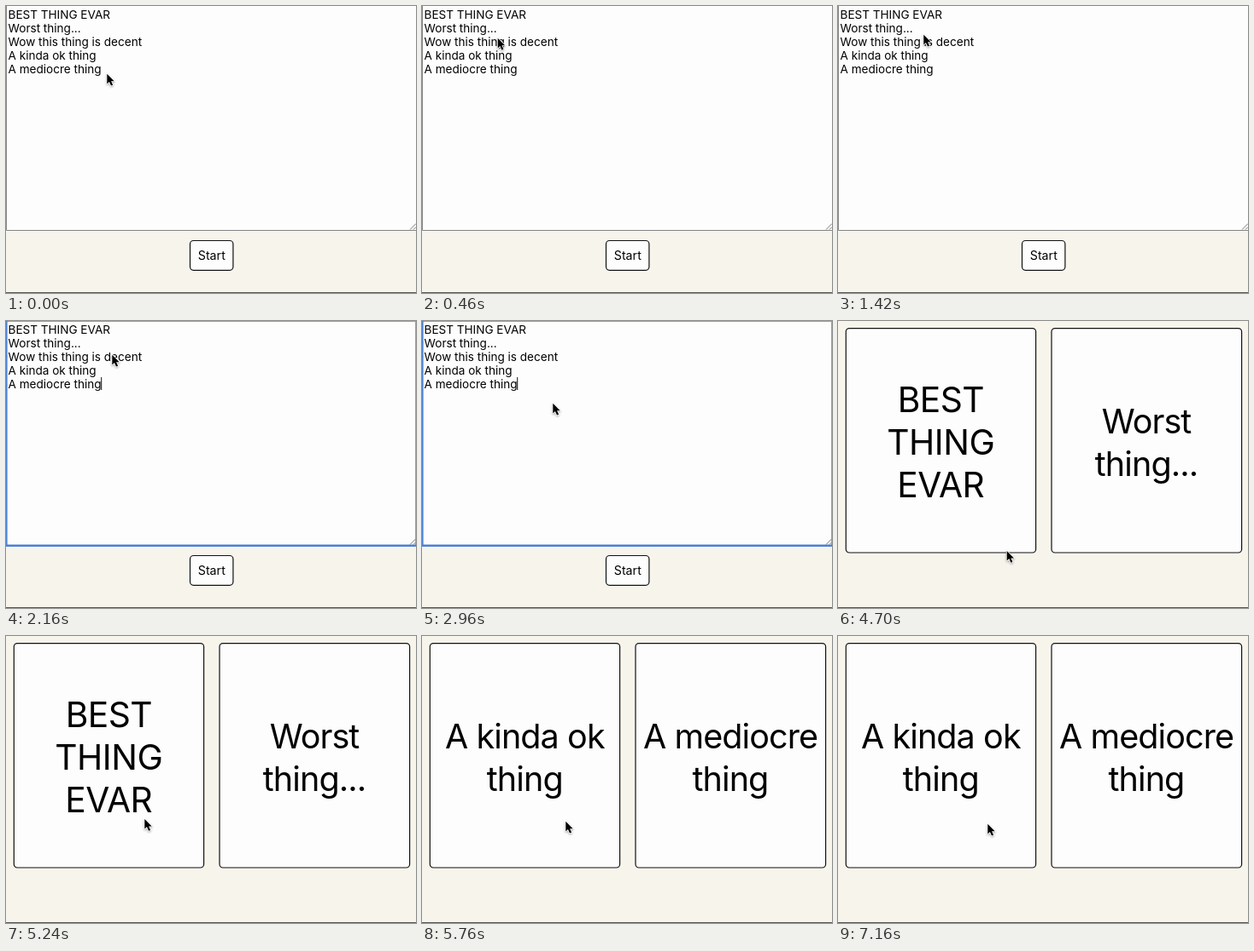
An HTML page that plays this animation: 480x337 px, repeating every 8000 ms.

```html
<!DOCTYPE html>
<html lang="en">
<head>
<meta charset="utf-8">
<title>Sorting things</title>
<style>
  html, body { margin: 0; width: 100%; height: 100%; overflow: hidden; background: #f7f4ec; }
  svg { display: block; width: 100vw; height: 100vh; }
  text { font-family: Inter, Roboto, sans-serif; font-optical-sizing: none; fill: #000; white-space: pre; }
  .entry text { font-size: 13.55px; }
  .label { font-size: 14.2px; text-anchor: middle; }
  .card text { font-size: 39.5px; letter-spacing: -.9px; text-anchor: middle; }
  .card .caps { font-size: 40.7px; letter-spacing: -.5px; }
  .button { fill: #fdfdfd; stroke: #111; stroke-width: 1.2; }
  .ring { fill: none; stroke: #4299e1; stroke-opacity: .5; stroke-width: 3.5; }
  .focus { fill: none; stroke: #4b80d6; }
</style>
</head>
<body>
<svg viewBox="0 0 480 337" preserveAspectRatio="none">
  <rect width="480" height="337" fill="#f7f4ec"/>
  <path d="M0 336.5H480" stroke="#555"/>

  <g id="editor">
    <rect width="480" height="263" fill="#fdfdfd"/>
    <path d="M.5 0V263.5H480" fill="none" stroke="#858585"/>
    <path d="M473 262.5L480 255.5M477 262.5L480 259.5" stroke="#666" stroke-width=".9"/>
    <g id="focus" class="focus">
      <path d="M0 .5H480M479.5 0V263" stroke="#7ba3e6"/>
      <path d="M.8 0V264" stroke-width="1.6"/>
      <path d="M0 263.8H480" stroke-width="2.6"/>
    </g>
    <g id="entry" class="entry"></g>
    <path id="caret" d="M111.7 66V81" stroke="#111"/>
    <rect id="startRing" class="ring" x="213.5" y="273.5" width="54.4" height="38.8" rx="6"/>
    <rect class="button" x="215.5" y="275.5" width="50.4" height="34.8" rx="4"/>
    <text class="label" x="240.8" y="298">Start</text>
  </g>

  <g id="cards">
    <rect id="cardRing" class="ring" x="7" y="6.5" width="227" height="267.5" rx="6"/>
    <rect class="button" x="9.3" y="8.6" width="222.3" height="263.4" rx="4"/>
    <rect class="button" x="250" y="8.6" width="222.6" height="263.4" rx="4"/>
    <g id="firstPair" class="card"></g>
    <g id="secondPair" class="card"></g>
  </g>

  <g id="pointer">
    <path d="M.3 .8v11.6l2.6 -2.5l2.1 4.7l2.1 -.9l-2 -4.5h3.6z" fill="#000" stroke="#fff"
      stroke-width="1.6" stroke-linejoin="round" paint-order="stroke"
      style="filter: drop-shadow(0 1px 1px #0005)"/>
  </g>
</svg>
<script>
const LOOP = 8000;
const FOCUS = 1460, BLUR = 4020, CARDS = 4180, PRESS = 5660, NEXT_PAIR = 5720;
const BLINK = 600, BLINK_START = 1680;

// The pointer eases from where it is to a new place, then rests.
const HOME = { x: 118, y: 79 };
const moves = [
  { from: 20, to: 300, x: 69, y: 6 },
  { from: 300, to: 600, x: 104, y: 62 },
  { from: 1180, to: 1220, x: 100, y: 33 },
  { from: 2060, to: 2160, x: 124, y: 39 },
  { from: 2160, to: 2860, x: 153, y: 96 },
  { from: 3380, to: 3840, x: 239, y: 304 },
  { from: 4560, to: 4960, x: 93, y: 182 },
  { from: 4960, to: 5300, x: 168, y: 217 },
  { from: 7020, to: 7160, x: 175, y: 220 }
];

const byId = id => document.getElementById(id);

function addLine(group, content, x, y, className = '') {
  const node = document.createElementNS('http://www.w3.org/2000/svg', 'text');
  node.setAttribute('x', x);
  node.setAttribute('y', y);
  node.setAttribute('class', className);
  node.textContent = content;
  byId(group).append(node);
}

function addCard(group, lines, x, className) {
  const top = 157 - (lines.length - 1) * 24.8;
  lines.forEach((line, i) => addLine(group, line, x, top + i * 49.6, className));
}

['BEST THING EVAR', 'Worst thing...', 'Wow this thing is decent', 'A kinda ok thing', 'A mediocre thing']
  .forEach((line, i) => addLine('entry', line, 2.6, 15 + 16 * i));
addCard('firstPair', ['BEST', 'THING', 'EVAR'], 120.3, 'caps');
addCard('firstPair', ['Worst', 'thing...'], 361);
addCard('secondPair', ['A kinda ok', 'thing'], 120.3);
addCard('secondPair', ['A mediocre', 'thing'], 361);

function pointerAt(t) {
  let { x, y } = HOME;
  for (const move of moves) {
    const u = Math.min(1, Math.max(0, (t - move.from) / (move.to - move.from)));
    const ease = u * u * (3 - 2 * u);
    x += (move.x - x) * ease;
    y += (move.y - y) * ease;
  }
  return [x, y];
}

function show(id, visible) {
  byId(id).style.display = visible ? '' : 'none';
}

function draw(t) {
  const focused = t >= FOCUS && t < BLUR;
  const caretOn = t < BLINK_START || Math.floor((t - BLINK_START) / BLINK) % 2 === 0;
  show('editor', t < CARDS);
  show('focus', focused);
  show('caret', focused && caretOn);
  show('startRing', t >= BLUR);
  show('cards', t >= CARDS);
  show('cardRing', t >= PRESS && t < NEXT_PAIR);
  show('firstPair', t < NEXT_PAIR);
  show('secondPair', t >= NEXT_PAIR);
  byId('pointer').setAttribute('transform', `translate(${pointerAt(t)})`);
}

const start = performance.now();
function tick() {
  draw((performance.now() - start) % LOOP);
  requestAnimationFrame(tick);
}
tick();
</script>
</body>
</html>
```
